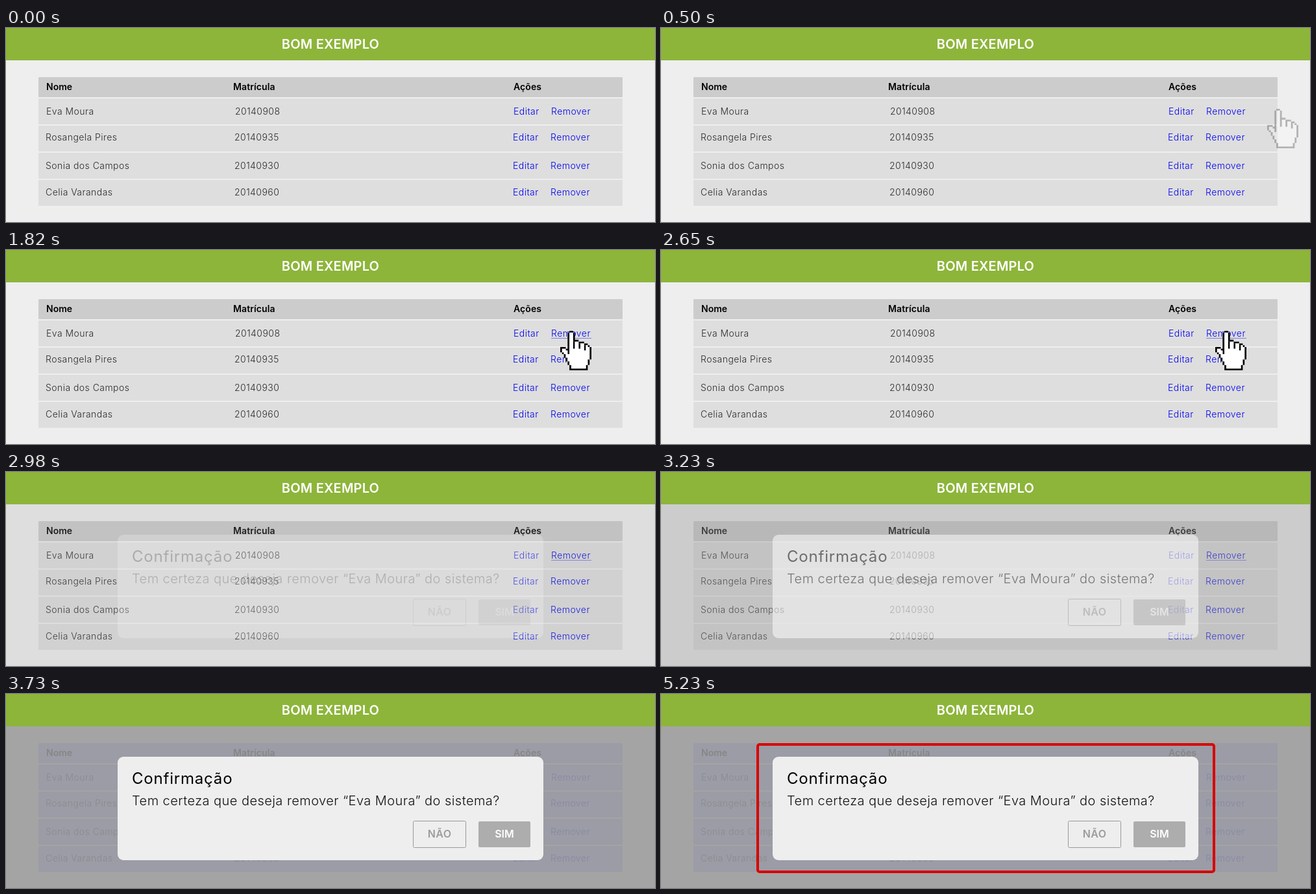
An HTML page with a canvas that plays this animation: 1000x300 px, repeating every 8000 ms.

```html
<!DOCTYPE html>
<html lang="pt-BR">
<head>
<meta charset="utf-8">
<title>Bom exemplo</title>
<style>
html, body { margin: 0; width: 100%; height: 100%; overflow: hidden; background: #eee; }
canvas { display: block; width: 1000px; height: 300px; }
</style>
</head>
<body>
<canvas id="stage" width="1000" height="300"></canvas>
<script>
const LOOP = 8000;
const FONT = 'Inter, "Open Sans", sans-serif';
const ROWS = [
  { name: 'Eva Moura', id: '20140908', y: 134, x: 1 },
  { name: 'Rosangela Pires', id: '20140935', y: 174, x: 0 },
  { name: 'Sonia dos Campos', id: '20140930', y: 218, x: 0 },
  { name: 'Celia Varandas', id: '20140960', y: 259, x: 0 }
];
const NORMAL = { bg: '#eeeeee', head: '#cccccc', row: '#dedede', title: '#000', text: '#2a2a2a', link: '#0000f0' };
const DIMMED = { bg: '#a4a4a4', head: '#9b9ca6', row: '#9b9ca6', title: '#868686', text: '#8b8b8d', link: '#8788a4' };

// Pointer hand on a 17 x 22 grid
const HAND_EDGE = new Path2D('M5 0h2v1h1v4h2v1h3v1h2v1h1v1h1v7h-1v3h-1v3h-10v-3h-1v-2h-1v-2h-1v-2h-1v-1h-1v-3h3v1h1v-9h1z');
const HAND_FILL = new Path2D('M5 1h2v5h3v1h3v1h2v1h1v7h-1v3h-1v2h-8v-2h-1v-2h-1v-2h-1v-2h-1v-1h-1v-2h2v1h1v2h1z');
const HAND_GAPS = [[7, 6, 4], [10, 7, 3], [13, 8, 3]];

const ctx = document.getElementById('stage').getContext('2d');

function label(str, x, y, size, weight, color, spacing = 0, align = 'left') {
  ctx.font = `${weight} ${size}px ${FONT}`;
  ctx.letterSpacing = spacing + 'px';
  ctx.textAlign = align;
  ctx.fillStyle = color;
  ctx.fillText(str, x, y);
}

function box(x, y, w, h, r, color) {
  ctx.beginPath();
  ctx.roundRect(x, y, w, h, r);
  ctx.fillStyle = color;
  ctx.fill();
}

function outline(x, y, w, h, r, width, color) {
  ctx.beginPath();
  ctx.roundRect(x, y, w, h, r);
  ctx.lineWidth = width;
  ctx.strokeStyle = color;
  ctx.stroke();
}

function drawTable(look, hover) {
  ctx.fillStyle = look.bg;
  ctx.fillRect(0, 50, 1000, 250);
  box(50, 76, 900, 31, 1, look.head);
  label('Nome', 62, 96, 14, 600, look.title);
  label('Matrícula', 350, 96, 14, 600, look.title, 0.1);
  label('Ações', 782, 96, 14, 600, look.title, 0.1);
  ROWS.forEach((r, i) => {
    box(50, 109 + i * 42, 900, 40, 1, look.row);
    const put = (str, x, color) => label(str, x + r.x, r.y, 14, 300, color, 0.45);
    put(r.name, 61, look.text);
    put(r.id, 352, look.text);
    put('Editar', 781, look.link);
    put('Remover', 839, look.link);
  });
  if (hover) {
    ctx.fillStyle = '#7f7fe8';
    ctx.fillRect(840, 136, 62, 1);
  }
}

function drawBar() {
  ctx.fillStyle = '#8db53a';
  ctx.fillRect(0, 0, 1000, 50);
  label('BOM EXEMPLO', 500, 32, 20, 600, '#fff', 0.2, 'center');
}

function drawModal(alpha) {
  ctx.globalAlpha = alpha;
  box(172, 97, 656, 160, 9, alpha < 1 ? '#fff' : '#eee');
  label('Confirmação', 194, 139, 24, 400, '#000', 0.8);
  label('Tem certeza que deseja remover “Eva Moura” do sistema?', 194, 172, 20, 300, '#111', 0.45);
  outline(627.5, 196.5, 81, 41, 2, 1, '#999');
  box(728, 197, 80, 40, 2, '#adadad');
  label('NÃO', 668, 222, 16, 600, '#9c9c9c', 0.4, 'center');
  label('SIM', 768, 222, 16, 600, '#fff', 0, 'center');
  ctx.globalAlpha = 1;
}

function drawHand(x, alpha) {
  ctx.save();
  ctx.globalAlpha = alpha;
  ctx.translate(x, 125);
  ctx.scale(48 / 17, 61 / 22);
  // Cut the fill out of the edge so that both fade evenly
  const edge = new Path2D(HAND_EDGE);
  edge.addPath(HAND_FILL);
  ctx.fillStyle = '#000';
  ctx.fill(edge, 'evenodd');
  const fill = new Path2D(HAND_FILL);
  HAND_GAPS.forEach(([gx, gy, h]) => {
    ctx.fillRect(gx, gy, 1, h);
    fill.rect(gx, gy, 1, h);
  });
  ctx.fillStyle = '#fff';
  ctx.fill(fill, 'evenodd');
  ctx.restore();
}

function drawClick() {
  ctx.strokeStyle = '#000';
  ctx.lineWidth = 2;
  ctx.beginPath();
  for (let i = 0; i < 8; i++) {
    const a = i * Math.PI / 4, dx = Math.cos(a), dy = Math.sin(a);
    ctx.moveTo(866 + dx * 28, 134.5 + dy * 28);
    ctx.lineTo(866 + dx * 42, 134.5 + dy * 43);
  }
  ctx.stroke();
}

function draw(t) {
  const open = t >= 3480;
  drawTable(open ? DIMMED : NORMAL, t >= 1490 && !open);

  if (t >= 500 && t < 2980) {
    const step = Math.min(4, Math.floor((t - 500) / 330));
    if (t >= 2150 && t < 2650) drawClick();
    drawHand(934 - 20 * step, Math.min(1, (step + 1) / 4));
  }

  if (t >= 2980) {
    const early = t < 3230;
    if (!open) {
      ctx.globalAlpha = early ? 0.2 : 0.4;
      ctx.fillStyle = '#999';
      ctx.fillRect(0, 50, 1000, 250);
    }
    drawModal(open ? 1 : early ? 0.22 : 0.52);
  }
  if (t >= 5230) outline(149, 78, 703, 197, 3, 4, '#d90000');
  drawBar();
}

const start = performance.now();
function tick(now) {
  draw(Math.max(0, now - start) % LOOP);
  requestAnimationFrame(tick);
}
draw(0);
requestAnimationFrame(tick);
</script>
</body>
</html>
```
